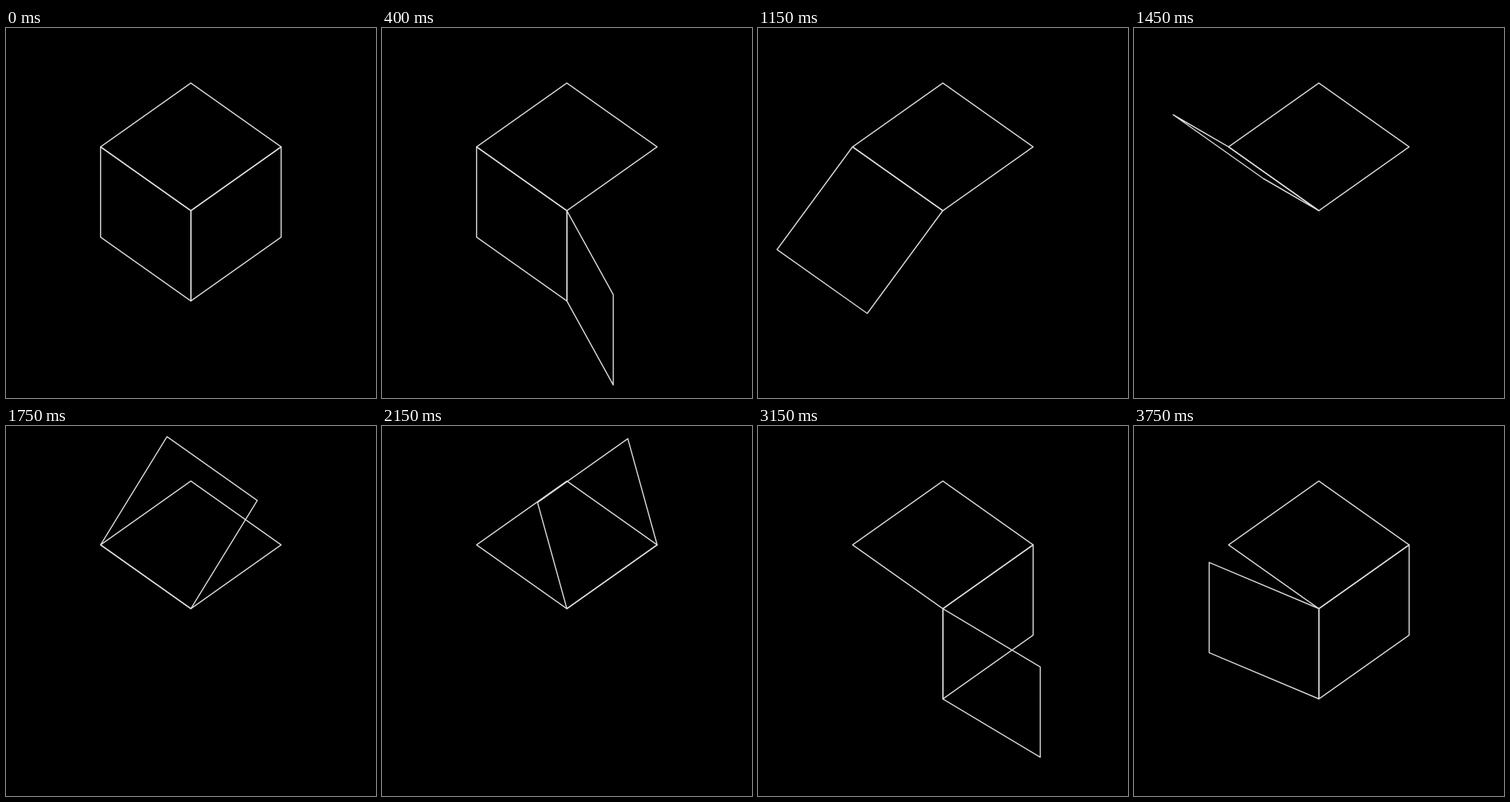
An HTML page with a canvas for the animation above (3800 ms loop, 500 by 500 pixels).

```html
<!DOCTYPE html>
<html>
<head>
<meta charset="utf-8">
<style>
  html, body { margin: 0; height: 100%; overflow: hidden; background: #000; }
  canvas { display: block; }
</style>
</head>
<body>
<canvas id="stage" width="500" height="500"></canvas>
<script>
const ctx = document.getElementById('stage').getContext('2d');
const LOOP = 3800, STEP = 50, TURN = LOOP / 4;

// Projected cube edges leaving the front corner
const S = 122, H = S * Math.SQRT1_2;
const corner = [249.8, 246.8];
const right = [S, -H], left = [-S, -H], down = [0, S];

const add = (p, q) => [p[0] + q[0], p[1] + q[1]];
const neg = p => [-p[0], -p[1]];

// Direction reached when turning from one axis towards another
const swing = (from, to, angle) => from.map((v, i) => v * Math.cos(angle) + to[i] * Math.sin(angle));

function face(u, v) {
  ctx.beginPath();
  for (const p of [corner, add(corner, u), add(add(corner, u), v), add(corner, v)]) ctx.lineTo(...p);
  ctx.closePath();
  ctx.stroke();
}

// Each phase swings one face 270 degrees about an edge of the top face or the front edge
const phases = [
  a => { face(left, down); face(down, swing(right, neg(left), a)); },
  a => face(left, swing(down, neg(right), a)),
  a => face(right, swing(left, neg(down), a)),
  a => { face(right, down); face(down, swing(right, neg(left), a)); }
];

function draw(now) {
  const t = Math.floor(now % LOOP / STEP) * STEP;
  ctx.fillStyle = '#000';
  ctx.fillRect(0, 0, 500, 500);
  ctx.strokeStyle = '#dcdcdc';
  ctx.lineWidth = 1.5;
  ctx.lineJoin = 'round';
  face(left, right);
  phases[Math.floor(t / TURN)](t % TURN / TURN * 1.5 * Math.PI);
}

const start = performance.now();
function tick() {
  draw(performance.now() - start);
  requestAnimationFrame(tick);
}
tick();
</script>
</body>
</html>
```
